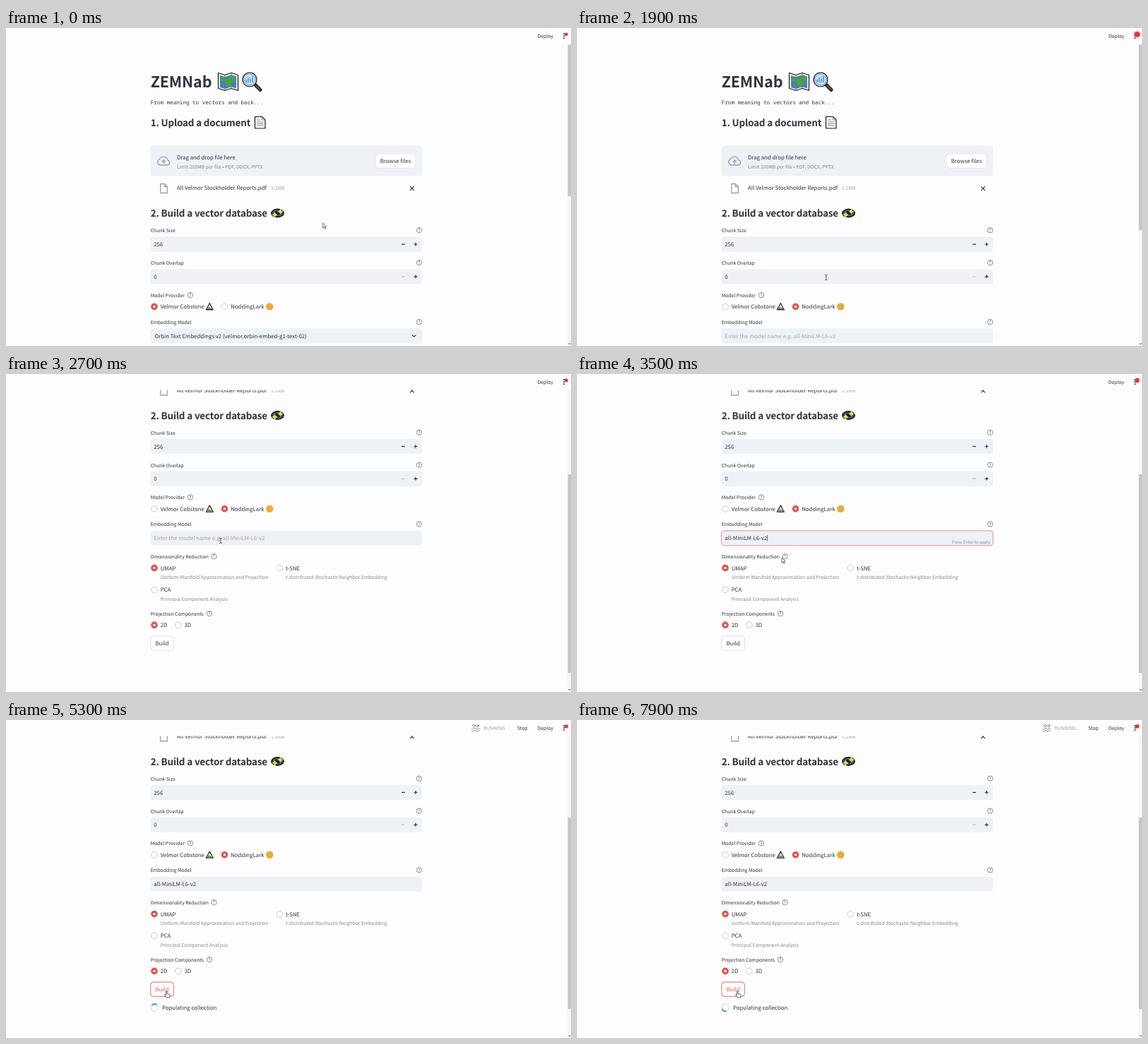
Write an HTML page that moves like this. It is 800x450 px and loops after 8 s.

```html
<!DOCTYPE html>
<html lang="en">
<head>
<meta charset="utf-8">
<title>Vector map demo</title>
<style>
html, body { margin: 0; width: 100%; height: 100%; overflow: hidden; background: #fdfdfe; }
svg { display: block; width: 100vw; height: 100vh; }
text {
  font: 7.815px "Noto Sans CJK JP", "Noto Sans CJK SC", "Noto Sans CJK", "Open Sans", sans-serif;
  fill: #31333f; text-rendering: geometricPrecision; white-space: pre;
}
.s { font-size: 6.838px; }
.xs { font-size: 5.86px; }
.grey { fill: #85878f; }
.hint { fill: #a2a5ac; }
.mid { text-anchor: middle; }
.h1 { font-size: 21.5px; font-weight: 700; letter-spacing: -.12px; }
.h3 { font-size: 13.45px; font-weight: 600; letter-spacing: -.17px; }
.mono { font: 7.62px "Noto Sans Mono", "DejaVu Sans Mono", monospace; }
.box { fill: #eef1f5; }
.line { fill: none; stroke: #31333f; stroke-width: 1.2; }
.thin { fill: none; stroke: #6f717a; stroke-width: .8; }
.icon { fill: none; stroke: #9a9fb0; stroke-width: 1.3; stroke-linejoin: round; }
.ink { stroke: #15181c; stroke-width: 1.2; stroke-linejoin: round; }
</style>
</head>
<body>
<svg id="stage" viewBox="0 0 800 450"></svg>
<script>
const LOOP = 8000, PICK = 1200, SWAP = 1400, FOCUS = 2900, CLICK = 4700, RUN = 4900;
const MODEL = "all-MiniLM-L6-v2";
const $ = id => document.getElementById(id);

const text = (x, y, s, cls = "", id = "") => `<text x="${x}" y="${y}" class="${cls}" id="${id}">${s}</text>`;
const path = (d, cls, extra = "") => `<path d="${d}" class="${cls}" ${extra}/>`;
const field = (y, id = "") => `<rect x="204.5" y="${y}" width="384.5" height="21" rx="4" class="box" id="${id}"/>`;
const help = (x, y) => `<circle cx="${x}" cy="${y}" r="3.7" class="thin"/>` + text(x, y + 2.1, "?", "xs mid");
const label = (y, s, x = 585) => text(204.7, y, s, "s") + help(x, y - 2.9);
const radio = (x, y, s, on, id = "") =>
  `<circle cx="${x}" cy="${y}" r="4.3" fill="#fff" stroke="#b9bcc6" stroke-width=".8" id="${id}Off"/>
   <g id="${id}" ${on ? "" : 'display="none"'}><circle cx="${x}" cy="${y}" r="4.7" fill="#ee4848"/>
   <circle cx="${x}" cy="${y}" r="1.8" fill="#fff"/></g>` + text(x + 8.7, y + 3, s);
const stepper = (y, faint) =>
  path(`M560 ${y}h5`, "line", faint ? 'opacity=".25"' : "") + path(`M577.5 ${y}h5m-2.5 -2.5v5`, "line");
const star = (x, y, r) =>
  path(`M${x} ${y - r}l${r * .35} ${r * .65}l${r * .65} ${r * .35}l${-r * .65} ${r * .35}l${-r * .35} ${r * .65}` +
       `l${-r * .35} ${-r * .65}l${-r * .65} ${-r * .35}l${r * .65} ${-r * .35}z`, "", 'fill="#f3dc3c"');

const emoji = {
  map: path("M300.5 63.5l9.5 3 9-3 9.5 3v22l-9.500-3-9 3-9.500-3z", "ink", 'fill="#f4f3e4"') +
    path("M303 67l7 2.200 9-3 7 2.300v17l-7-2.300-9 3-7-2.200z", "", 'fill="#3f83c4"') +
    path("M304 69l6 1.500 4 2 5-5 6 2.500-1 6-4 1-1 5-4 2-3-4-3-4-4-1z", "", 'fill="#4aa540"') +
    path("M310 67v21m9-24v21", "thin", 'stroke="#26384a"'),
  lens: path("M352.500 80l7.500 7.500", "", 'stroke="#15181c" stroke-width="5" stroke-linecap="round"') +
    path("M354 81.500l5.500 5.500", "", 'stroke="#6b4b43" stroke-width="2.500" stroke-linecap="round"') +
    `<circle cx="345" cy="73" r="10" fill="#bfe0f0" class="ink"/>
     <circle cx="345" cy="73" r="8" fill="none" stroke="#8fa2ae"/>` +
    path("M340 77v-4m3 4v-7m3 7v-5m3 5v-9", "", 'stroke="#5d92ba" stroke-width="1.500"'),
  page: path("M352.500 125.500h10l4.500 4.500v12h-14.500z", "ink", 'fill="#fafafa"') +
    path("M362.500 125.500v4.500h4.500M355 130h5M355 133h9.500m-9.500 2.500h9.500m-9.500 2.500h9.500", "thin"),
  orbit: `<ellipse cx="384.500" cy="262" rx="8.800" ry="5.800" fill="#15242e" class="ink"/>
     <ellipse cx="384.500" cy="262" rx="6.500" ry="3.600" fill="none" stroke="#3f7fa8" stroke-width="1.400"/>` +
    star(380.5, 264.3, 4.2) + star(388.5, 259.7, 4.2),
  hill: path("M288.300 389.500l5 9.200h-10z", "ink", 'fill="#fff"') +
    path("M285.200 395.700l2-1 2 1 2.200-.9 1.300 3.300h-8.800z", "", 'fill="#6f9c5a"'),
  disc: `<circle cx="373.300" cy="394.300" r="5.200" fill="#e9ad35"/>`
};

const page = `<g id="page">
  ${text(204.7, 84, "ZEMNab", "h1")}${emoji.map}${emoji.lens}
  ${text(204.7, 107.6, "From meaning to vectors and back...", "mono")}
  ${text(204.7, 138.5, "1. Upload a document", "h3")}${emoji.page}
  <rect x="204.500" y="166.500" width="384.500" height="43" rx="4" class="box"/>
  ${path("M218 194a4.500 4.500 0 0 1-.5-8.500a6 6 0 0 1 11.300 1.500a3.600 3.600 0 0 1 0 7zM223.300 192.500v-5m-2.500 2l2.500-2.500 2.500 2.500", "icon")}
  ${text(242, 185.5, "Drag and drop file here")}
  ${text(242, 198.9, "Limit 200MB per file • PDF, DOCX, PPTX", "s grey")}
  <rect x="523" y="178" width="57" height="20.300" rx="4" fill="#fff" stroke="#dcdee3" stroke-width=".7"/>
  ${text(551.5, 191.2, "Browse files", "mid")}
  ${path("M218.700 220.500h5.800l3.800 3.800v9.200h-9.600zM224.300 220.500v4h4", "icon")}
  ${text(242, 229.3, "All Velmor Stockholder Reports.pdf")}${text(375, 229.3, "1.2MB", "s hint")}
  ${path("M572.200 224.200l5.600 5.600m0-5.600l-5.600 5.600", "line")}
  ${text(204.7, 267, "2. Build a vector database", "h3")}${emoji.orbit}
  ${label(289.1, "Chunk Size")}${field(295.5)}${text(209.3, 309, "256")}${stepper(306)}
  ${label(335, "Chunk Overlap")}${field(341.3)}${text(209.3, 354.8, "0")}${stepper(351.8, true)}
  ${label(380.8, "Model Provider", 261)}
  ${radio(210, 394.3, "Velmor Cobstone", true, "first")}${emoji.hill}
  ${radio(309.5, 394.3, "NoddingLark", false, "second")}${emoji.disc}
  ${label(418.8, "Embedding Model")}${field(425.3, "model")}
  <g id="select">${text(210.5, 438.6, "Orbin Text Embeddings v2 (velmor.orbin-embed-g1-text-02)")}
    ${path("M575 434.300l2.700 2.700 2.700-2.700", "line")}</g>
  ${text(209.3, 438.8, "", "", "entry")}
  ${path("M0 431.500v8.500", "line", 'id="caret" style="stroke-width:.7"')}
  ${text(530.8, 443.6, "Press Enter to apply", "xs grey", "apply")}
  ${label(464.5, "Dimensionality Reduction", 294.5)}
  ${radio(210, 478, "UMAP", true)}${text(218.7, 493.7, "Uniform Manifold Approximation and Projection", "s grey")}
  ${radio(387.3, 478, "t-SNE")}${text(396, 493.7, "t-distributed Stochastic Neighbor Embedding", "s grey")}
  ${radio(210, 508.8, "PCA")}${text(218.7, 524.5, "Principal Component Analysis", "s grey")}
  ${label(545.4, "Projection Components", 288)}
  ${radio(210, 558.8, "2D", true)}${radio(243.8, 558.8, "3D")}
  <rect x="204.800" y="574.400" width="32.500" height="20.300" rx="4" fill="#fff" stroke-width=".9" id="build"/>
  ${text(221, 587.8, "Build", "mid", "buildText")}
  <g id="wait"><circle cx="210.400" cy="610.500" r="5.200" fill="none" stroke="#dfe1e6" stroke-width="1.400"/>
    ${path("M206.720 606.820a5.200 5.200 0 0 1 7.360 0", "", 'fill="none" stroke="#2a7fd6" stroke-width="1.500" id="arc"')}
    ${text(221, 613.8, "Populating collection")}</g>
</g>`;

const chrome = `<rect width="800" height="22.700" fill="#fdfdfe"/>
  <g id="running">
    ${path("M659.500 12.500q1.400 1.400 2.800 0t2.800 0 2.800 0 2.800 0M659.500 15.500q1.400 1.400 2.800 0t2.800 0 2.800 0 2.800 0M661 10.500l4.500-2.500-2-1.500-3.500 1M665.500 8l2.500 3", "icon", 'style="stroke:#85878f;stroke-width:1"')}
    <circle cx="668.800" cy="8" r="1.400" fill="#85878f"/>
    ${text(676, 14, "RUNNING...", "s hint")}${text(723.8, 14, "Stop", "s")}</g>
  ${text(752.5, 14, "Deploy", "s")}
  <g fill="#31333f"><circle cx="790" cy="8" r="1"/><circle cx="790" cy="11.200" r="1"/><circle cx="790" cy="14.300" r="1"/></g>
  <circle cx="793.300" cy="9" id="halo" fill="#ff5a50" opacity=".3"/>
  <circle cx="793.300" cy="9" id="dot" fill="#ee2f2c"/>
  <rect x="795" y="22.700" width="5" height="427.300" fill="#f6f6f7"/>
  <rect x="795.500" width="4.500" id="thumb" fill="#c4c5c8"/>
  ${path("M796.500 446l1.500 1.700 1.500-1.700", "line", 'style="stroke-width:.8"')}`;

const cursors = `
  ${path("M0 0v7l1.600-1.400 1.300 2.700 1.100-.5-1.200-2.600 2.100-.2z", "", 'fill="#fff" stroke="#333" stroke-width=".7" id="arrow"')}
  ${path("M-.7 .500q.800-.900 1.500 0v3.300l3.300.800q1 .500.800 1.700l-.7 3h-4.500l-2.500-3.500q.200-1.200 1.300-.5l.8.700z", "", 'fill="#fff" stroke="#333" stroke-width=".8" id="hand"')}
  ${path("M-1.800-3.500q1.400 0 1.800.5q.4-.5 1.800-.5M0-3v6m-1.800.5q1.400 0 1.800-.5q.4.500 1.800.5", "", 'fill="none" stroke="#333" stroke-width=".8" id="beam"')}`;

$("stage").innerHTML = page + chrome + cursors;

// Keys are [time, ...values]; values ease from one key to the next.
function track(t, keys) {
  const i = keys.findLastIndex(k => k[0] <= t), a = keys[Math.max(i, 0)], b = keys[i + 1];
  if (i < 0 || !b) return a.slice(1);
  const u = (t - a[0]) / (b[0] - a[0]), e = u * u * (3 - 2 * u);
  return a.slice(1).map((v, j) => typeof v === "number" ? v + (b[j + 1] - v) * e : v);
}
const show = (id, on) => $(id).style.display = on ? "inline" : "none";
const attr = (id, name, value) => $(id).setAttribute(name, value);

const pointer = [
  [0, 448.8, 276, "arrow"], [150, 448.8, 276, "arrow"], [600, 345, 420, "hand"], [850, 312.3, 394.5, "hand"],
  [1250, 312.3, 394.5, "arrow"], [1600, 350, 354, "beam"], [1850, 352.8, 353, "beam"], [2300, 352.8, 353, "beam"],
  [2650, 304, 236, "beam"], [2950, 304, 236, "beam"], [3350, 290, 260, "arrow"], [3550, 290, 260, "arrow"],
  [4150, 227.3, 383.5, "hand"]
];

function draw(now) {
  const t = now % LOOP;
  const [scroll] = track(t, [[2000, 0], [2450, 203.5]]);
  attr("page", "transform", `translate(0 ${-scroll})`);

  let [top, end] = track(t, [[2000, 23.5, 286], [2450, 142, 423]]);
  if (t < SWAP) end = 238;
  if (t >= RUN) [top, end] = [138, 409];
  attr("thumb", "y", top);
  attr("thumb", "height", end - top);

  show("first", t < PICK);
  show("second", t >= PICK);
  attr("secondOff", "fill", t > 800 ? "#e6e8ed" : "#fff");
  show("select", t < SWAP);

  const typed = t < 3100 ? "" : t < 3500 ? MODEL[0] : MODEL;
  const focused = t >= FOCUS && t < CLICK;
  const entry = $("entry");
  entry.textContent = t < SWAP ? "" : typed || "Enter the model name e.g. " + MODEL;
  entry.setAttribute("class", typed ? "" : "hint");
  attr("model", "stroke", focused ? "#e39387" : "none");
  show("caret", focused);
  attr("caret", "transform", `translate(${209.8 + (typed ? entry.getComputedTextLength() : 0)} 0)`);
  show("apply", focused && typed);

  const hot = t < 4150 ? "" : t < CLICK ? "#de7466" : "#e8544c";
  attr("build", "stroke", hot || "#d9dbe0");
  $("buildText").style.fill = hot || "#31333f";
  show("running", t >= CLICK);
  show("wait", t >= RUN);
  attr("arc", "transform", `rotate(${(t - 6400) * .36 + 30} 210.4 610.5)`);

  const pulse = (1 - Math.cos(t / 1280 * 2 * Math.PI)) / 2;
  attr("dot", "r", 2.3 + 1.5 * pulse);
  attr("halo", "r", 2.5 + 3 * pulse);

  const [x, y, kind] = track(t, pointer);
  for (const id of ["arrow", "hand", "beam"]) {
    show(id, id === kind);
    attr(id, "transform", `translate(${x} ${y})`);
  }
  requestAnimationFrame(draw);
}
draw(0);
</script>
</body>
</html>
```
